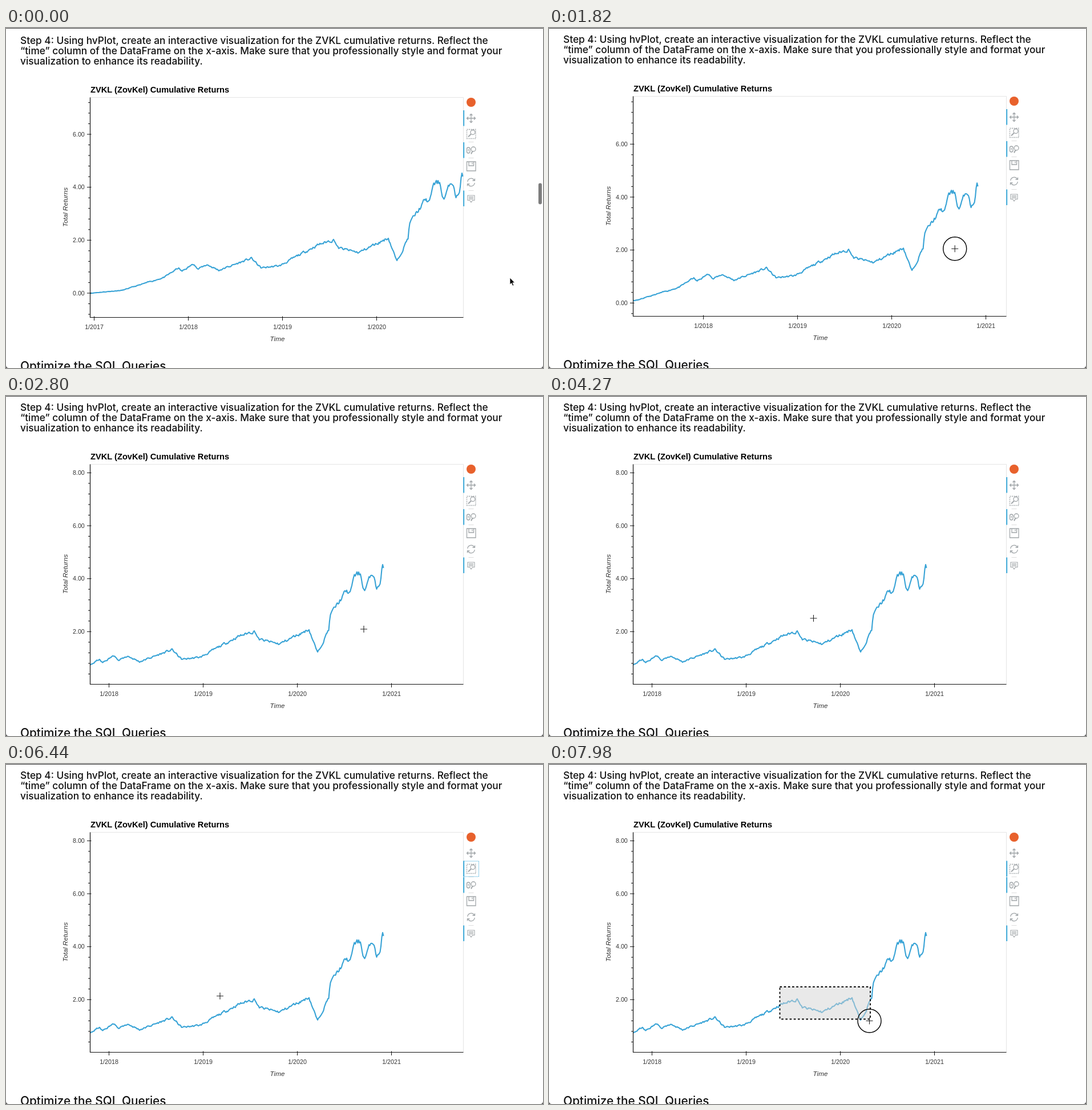
These frames come from a looping animation (941x595 px, 8 s). An HTML page:

```html
<!DOCTYPE html>
<html lang="en">
<head>
<meta charset="utf-8">
<title>Cumulative returns chart</title>
<style>
  html, body { margin: 0; width: 100%; height: 100%; overflow: hidden; background: #fff; }
  svg { display: block; width: 941px; height: 595px; }
  text { font-family: "Liberation Sans", Arial, sans-serif; fill: #333; }
  .prose text { font: 500 17.3px Inter, sans-serif; fill: #111; }
  .prose .heading { font-size: 20.8px; }
  .title { font-weight: bold; font-size: 14.67px; fill: #000; }
  .label { font-style: italic; font-size: 11.7px; text-anchor: middle; }
  .tick text { font-size: 10.7px; }
  .tick path { stroke: #111; }
  .icon { fill: none; stroke: #a1a6a9; stroke-width: 1.3; }
  .sep { stroke: #ddd; }
  .active { fill: #2ba3d8; }
</style>
</head>
<body>
<svg viewBox="0 0 941 595">
  <defs>
    <clipPath id="frame"><rect x="147.5" y="119.5" width="654" height="385"/></clipPath>
  </defs>
  <g id="page">
    <g class="prose">
      <text x="25" y="25.8">Step 4: Using hvPlot, create an interactive visualization for the ZVKL cumulative returns. Reflect the</text>
      <text x="25" y="44">“time” column of the DataFrame on the x-axis. Make sure that you professionally style and format your</text>
      <text x="25" y="62.2">visualization to enhance its readability.</text>
      <text x="25" y="596.5" class="heading">Optimize the SQL Queries</text>
    </g>

    <text x="148" y="111.3" class="title">ZVKL (ZovKel) Cumulative Returns</text>
    <path d="M147.5 119.5H801.5V504.5" fill="none" stroke="#e5e5e5"/>
    <g clip-path="url(#frame)">
      <path id="line" fill="none" stroke="#38a3d6" stroke-width="2.1" stroke-linejoin="round"/>
    </g>
    <rect id="select" x="404.5" y="390" fill="#d3d3d3" fill-opacity=".5" stroke="#000" stroke-width="1.8" stroke-dasharray="3.6"/>
    <path d="M147.5 119.5V504.5H801.5" fill="none" stroke="#111" stroke-width="1.2"/>
    <g id="ticks" class="tick"></g>
    <text x="475.5" y="545.8" class="label">Time</text>
    <text class="label" transform="translate(107.5 311.5) rotate(-90)">Total Returns</text>

    <circle cx="815" cy="128" r="8" fill="#e8612c"/>
    <g class="icon">
      <path d="M807.5 156h15M815 148.5v15M810 153.5l-2.5 2.5 2.5 2.5M820 153.5l2.5 2.5-2.5 2.5M812.5 151l2.5-2.5 2.5 2.5M812.5 161l2.5 2.5 2.5-2.5"/>
      <rect x="807.5" y="175.5" width="15.5" height="16" stroke-dasharray="2 1.5"/>
      <circle cx="818" cy="180.5" r="4" fill="#fff"/>
      <path d="M815 183.5l-5 5" stroke-width="1.8"/>
      <rect x="807.5" y="207" width="5.5" height="10" rx="2.7"/>
      <path d="M810.2 210v3"/>
      <circle cx="819" cy="210" r="4"/>
      <path d="M817.5 213.5l-2.5 5" stroke-width="1.8"/>
      <path d="M807.5 232h15.5v16h-15.5zM811 232v7h8.5v-7M817 233.5v3"/>
      <path d="M808.8 267a6.3 6.3 0 0 1 11.8-2.5M821.2 269a6.3 6.3 0 0 1-11.8 2.5M821.5 261.5v3.5h-4M808.5 274.5v-3.5h4"/>
      <path d="M809 291h12v8.5h-3.5l-2.5 3.5-2.5-3.5h-3.5zM811 293.5h8M811 295.5h8M811 297.5h8" stroke-width="1.1"/>
    </g>
    <path class="sep" d="M810.5 197.5h9M810.5 225.5h9M810.5 282.5h9"/>
    <rect id="tool" class="active" x="801.3" width="1.8" height="27.5"/>
    <rect class="active" x="801.3" y="198" width="1.8" height="27.5"/>
    <rect class="active" x="801.3" y="282.5" width="1.8" height="27.5"/>
    <rect id="focus" x="802.5" y="170" width="26" height="27" fill="none" stroke="#2ba3d8" stroke-dasharray="1"/>
  </g>

  <rect id="scroll" x="933" y="271.5" width="6" height="37" rx="3" fill="#7d7d7d"/>
  <path d="M0 0H941V1H0zM0 590v5h5q-5 0-5-5M941 590v5h-5q5 0 5-5" fill="#444"/>
  <g id="cursor">
    <circle id="press" r="20.5" fill="none" stroke="#000" stroke-width="1.4"/>
    <path id="cross" d="M-6 0H6M0-6V6" stroke="#222" stroke-width="1.1"/>
    <path id="arrow" d="M0 0V12l2.8-2.5 2 4.7 2-.9-2-4.5h3.7z" fill="#000" stroke="#fff" stroke-width=".8"/>
  </g>
</svg>

<script>
const $ = id => document.getElementById(id);
const LOOP = 8000, STEP = 70;
const LEFT = 147.5, RIGHT = 801.5, TOP = 119.5, BOTTOM = 504.5;
const ZERO = 462, UNIT = 46.33;

// Turning points of the series: x and height above zero, in pixels.
const trend = [
  [148, 0], [204, 5], [278, 28], [302, 44], [308, 38], [330, 52], [336, 42],
  [352, 50], [373, 40], [430, 61], [447, 44], [480, 48], [545, 84], [575, 94],
  [582, 79], [618, 71], [670, 97], [685, 55], [705, 98], [707, 122], [735, 163],
  [743, 160], [748, 190], [760, 194], [767, 164], [781, 196], [788, 170],
  [795, 176], [798, 202], [802, 206]
];

let seed = 11;
const noise = () => (seed = seed * 16807 % 2147483647) / 1073741823.5 - 1;

// Straight trend plus a mean-reverting wobble that grows with the value.
function seriesPath() {
  const points = [];
  let wobble = 0;
  for (let x = trend[0][0], i = 0; x < RIGHT; x += 1.5) {
    while (x >= trend[i + 1][0]) i++;
    const [x0, h0] = trend[i], [x1, h1] = trend[i + 1];
    const h = h0 + (h1 - h0) * (x - x0) / (x1 - x0);
    wobble = 0.6 * wobble + noise() * (0.3 + h / 45);
    points.push(`${x} ${(ZERO - h - wobble).toFixed(2)}`);
  }
  return 'M' + points.join('L');
}
$('line').setAttribute('d', seriesPath());

// Pointer path as [time, x, y]; it pauses where a place repeats.
const path = [
  [420, 883, 437], [910, 752, 372], [1050, 766, 365],
  [1330, 766, 365], [1470, 753.5, 371], [2170, 668, 399], [2590, 627, 408],
  [3010, 627, 408], [3570, 386, 330], [3850, 464, 389],
  [4270, 463.5, 389], [5040, 412, 392], [5670, 815, 153], [5880, 826, 191],
  [6020, 810, 191], [6440, 375, 406], [6860, 404.5, 390],
  [7070, 404.5, 390], [7840, 563, 446.5], [7980, 561.5, 449.5]
];

// Monotone cubic through the path: smooth, without overshoot.
function pointer(t) {
  const last = path.length - 1;
  if (t <= path[0][0]) return path[0].slice(1);
  if (t >= path[last][0]) return path[last].slice(1);
  const i = path.findIndex(k => k[0] > t) - 1;
  const span = path[i + 1][0] - path[i][0], u = (t - path[i][0]) / span, v = 1 - u;
  return [1, 2].map(c => {
    const slope = j => (path[j + 1][c] - path[j][c]) / (path[j + 1][0] - path[j][0]);
    const tangent = j => {
      if (j === 0 || j === last) return 0;
      const a = slope(j - 1), b = slope(j);
      return a * b <= 0 ? 0 : 2 * a * b / (a + b);
    };
    return path[i][c] * v * v * (1 + 2 * u) + path[i + 1][c] * u * u * (3 - 2 * u)
      + span * u * v * (tangent(i) * v - tangent(i + 1) * u);
  });
}

// The chart follows the dragging pointer with a slight lag.
const DRAG = [1330, 2590], LAG = 45;
function pan(t) {
  const [x0, y0] = pointer(DRAG[0]);
  const [x, y] = pointer(Math.max(DRAG[0], Math.min(DRAG[1], t - LAG)));
  return [x - x0, y - y0];
}

const within = (v, a, b) => v >= a && v < b;
const show = (id, on) => $(id).setAttribute('visibility', on ? 'visible' : 'hidden');
const move = (id, x, y) => $(id).setAttribute('transform', `translate(${x} ${y})`);

function ticks(dx, dy) {
  let s = '';
  for (let n = -5; n <= 25; n++) {
    const y = ZERO + dy - n * 0.4 * UNIT, major = n % 5 === 0;
    if (!within(y, TOP, BOTTOM)) continue;
    s += `<path d="M${major ? 142 : 144} ${y}H${major ? 149.5 : 147.5}"/>`;
    if (major) s += `<text x="137.8" y="${y + 3.8}" text-anchor="end">${(n * 0.4).toFixed(2)}</text>`;
  }
  for (let year = 2017; year <= 2021; year++) {
    const x = 154.5 + 165 * (year - 2017) + dx;
    if (!within(x, LEFT, RIGHT)) continue;
    s += `<path d="M${x} 502.5V510"/><text x="${x}" y="525" text-anchor="middle">1/${year}</text>`;
  }
  return s;
}

let shown = -1;
function draw(t) {
  if (t === shown) return;
  shown = t;
  const [dx, dy] = pan(t), [x, y] = pointer(t);
  move('page', 0, t < STEP ? 2 : 0);
  move('line', dx, dy);
  $('ticks').innerHTML = ticks(dx, dy);

  move('cursor', x, y);
  show('cross', x < RIGHT);
  show('arrow', x >= RIGHT);
  show('press', within(t, 1330, 2800) || within(t, 5880, 6090) || t >= 7070);
  $('scroll').setAttribute('opacity', Math.max(0, Math.min(1, (700 - t) / 280)));

  $('tool').setAttribute('y', t < 5950 ? 142 : 169.5);
  show('focus', within(t, 5950, 7070));

  const [sx, sy] = pointer(Math.min(t, 7840));
  $('select').setAttribute('width', Math.max(0, sx - 404.5));
  $('select').setAttribute('height', Math.max(0, sy - 390));
  show('select', t > 7070);
}

const start = performance.now();
function tick() {
  const t = (performance.now() - start) % LOOP;
  draw(Math.floor(t / STEP) * STEP);
  requestAnimationFrame(tick);
}
tick();
</script>
</body>
</html>
```
